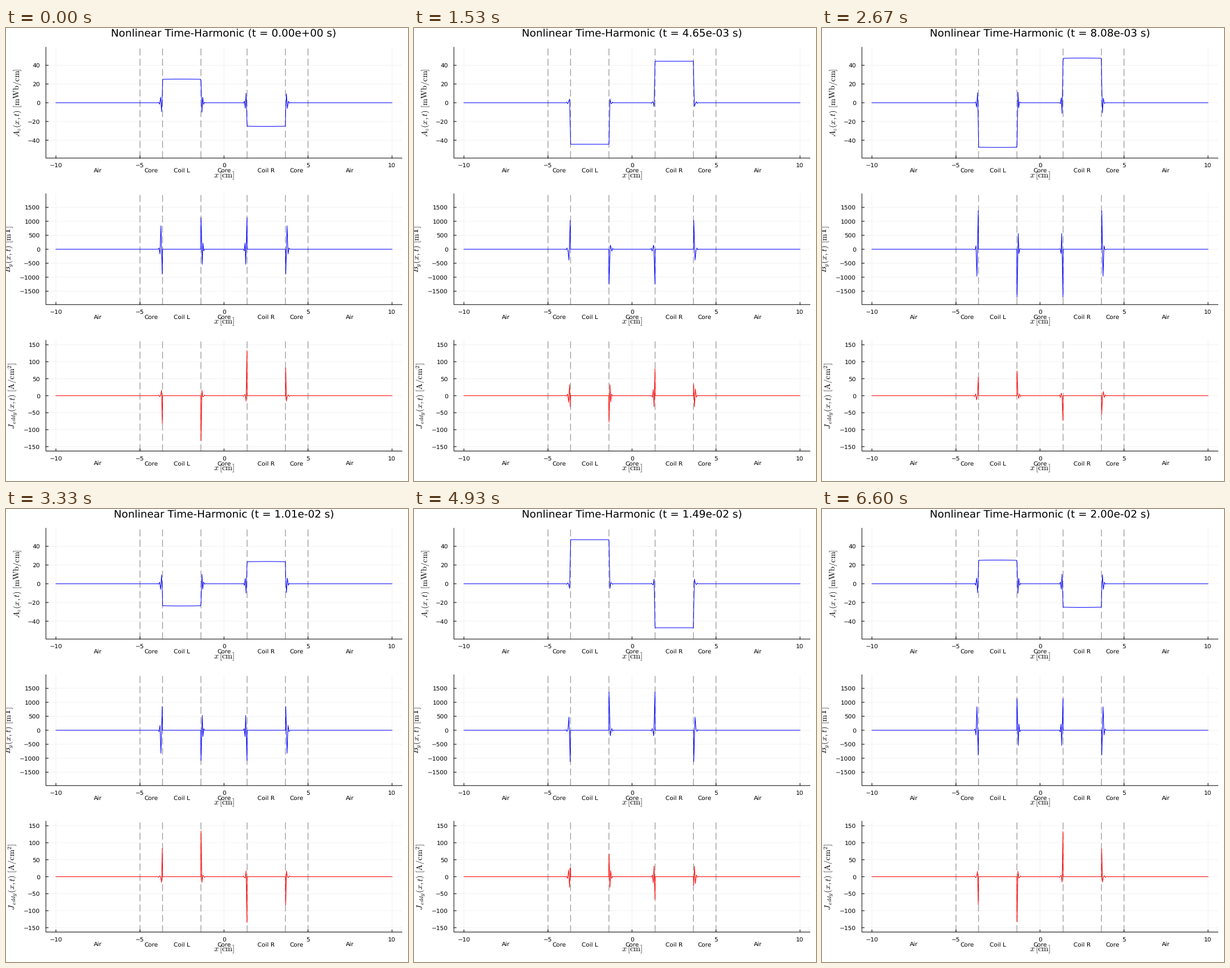
Write a matplotlib script that moves like this. It is 705 px wide and 794 px high and loops after 6.67 s.

```python
import numpy as np
import matplotlib.pyplot as plt
from matplotlib.animation import FuncAnimation

W, H, DPI = 705, 794, 100
TICK_MS, LOOP_MS = 23, 6670        # redraw interval, loop length
STEPS, STEP_MS = 100, 200 / 3      # solution steps at 15 per second
PERIOD = 0.02
PX = 72 / DPI                      # points per pixel

X0, X_SCALE = 382.3, 29.47         # pixel of x = 0, pixels per cm
LEFT, RIGHT = 70, 694.5
WALLS = (-5, -3.657, -1.374, 1.374, 3.657, 5)
REGIONS = ("Air", "Core", "Coil L", "Core", "Coil R", "Core", "Air")

plt.rcParams["font.family"] = "DejaVu Sans"
plt.rcParams["mathtext.fontset"] = "cm"
plt.rcParams["text.hinting"] = "none"
plt.rcParams["path.snap"] = False

fig = plt.figure(figsize=(W / DPI, H / DPI), dpi=DPI, facecolor="white")
ax = fig.add_axes([0, 0, 1, 1])
ax.set(xlim=(0, W), ylim=(H, 0))
ax.axis("off")


def px(x):
    return X0 + X_SCALE * x


def line(xs, ys, color, width=1, **kw):
    return ax.plot(xs, ys, color=color, lw=width * PX, **kw)[0]


def text(x, y, s, size=10.5, ha="center", **kw):
    return ax.text(x, y, s, fontsize=size * PX, ha=ha, va="baseline", **kw)


def mirror(x, v, sign):
    """Extend a left-half profile to the right half."""
    x, v = np.array(x), np.array(v, complex)
    return np.r_[x, 2 * X0 - x[::-1]], np.r_[v, sign * v[::-1]]


# Left-half phasors: outer core edge, coil, inner core edge
NODES_OUT = [px(-10), 266.5, 267.9, 269.4, 271.2, 272.8, 274.1]
NODES_IN = [342, 343.6, 345, 346.5, 348, 349.4]


def potential():
    u = np.linspace(-1, 1, 15)
    coil = 25 + 47.4j + 0.25 * (1 - u**2)
    x = [*NODES_OUT, *np.linspace(274.7, 341.4, 15), *NODES_IN]
    v = [0, 0, 0.4 - 0.6j, -1.6 + 0.9j, 6 - 0.3j, -9.6 - 5.1j, 8.3 + 28.3j,
         *coil, 22 + 46j, -10.2 - 5.2j, 5.8 + 1j, -1.8 + 0.9j, 0.4 - 0.6j, 0]
    return mirror(x, v, -1)


def flux():
    x = [px(-10), 265.6, 267, 268.4, 270, 271.7, 274, 274.4,
         341.5, 342, 344.2, 345.4, 346.9, 348.3, 349.7]
    v = [0, 0, 3 + 20j, 45 - 42j, -170 + 35j, 840 + 483j, -890 - 1140j, 0,
         0, 1130 + 1385j, -540 - 208j, 220 - 51j, -57 + 61j, 5 - 30j, 0]
    return mirror(x, v, 1)


def eddy():
    x = [*NODES_OUT, 274.5, 341.6, *NODES_IN]
    v = [0, 0, 2 + 1.2j, -2.6 - 5j, 1 + 20j, 16 - 31j, -82 + 24j, 0,
         0, -133 + 64j, 16 - 31j, -3 + 18j, -2.6 - 5.4j, 2 + 1.2j, 0]
    return mirror(x, v, -1)


def panel(zero, scale, ticks, label, label_x, field, color):
    top, bottom = zero - 97.3, zero + 97
    for x in (-10, -5, 0, 5, 10):
        line([px(x)] * 2, [top, bottom], "#f2f2f2", zorder=1)
        line([px(x)] * 2, [bottom, bottom - 4], "black", zorder=3)
        text(px(x), bottom + 16, str(x).replace("-", "\u2212"))
    for v in ticks:
        y = zero - scale * v
        line([LEFT, RIGHT], [y, y], "#f2f2f2", zorder=1)
        line([LEFT, LEFT + 4], [y, y], "black", zorder=3)
        text(59.7, y + 4, str(v).replace("-", "\u2212"), ha="right")
    line([LEFT, LEFT, RIGHT], [top, bottom, bottom], "black", zorder=3)

    for x in WALLS:
        ax.plot([px(x)] * 2, [bottom, top], color="#a0a0a0", lw=1.4 * PX,
                dashes=(12 / 1.4, 6 / 1.4), dash_capstyle="butt", zorder=2)
    edges = (-10, *WALLS, 10)
    for name, a, b in zip(REGIONS, edges, edges[1:]):
        text(px((a + b) / 2), bottom + 25, name)

    text(382, bottom + 34, r"$x\,[\mathrm{cm}]$", 14.4)
    text(label_x, zero, label, 14.4, rotation=90, rotation_mode="anchor")

    xs, phasor = field()
    return line(xs, np.full(len(xs), zero), color, zorder=4), phasor, zero, scale


panels = [
    panel(131, 1.642, range(-40, 41, 20),
          r"$A_z(x,t)\ [\mathrm{mWb/cm}]$", 24, potential, "blue"),
    panel(387.8, 0.049, range(-1500, 1501, 500),
          r"$B_y(x,t)\ [\mathrm{mT}]$", 9.5, flux, "blue"),
    panel(644.5, 0.5955, range(-150, 151, 50),
          r"$J_{\,eddy}(x,t)\ [\mathrm{A/cm}^2]$", 15, eddy, "red"),
]
title = text(382, 16, "", 18.35)


def step_at(tick):
    """Latest step begun in this tick; steps start on rounded 10 ms marks."""
    last_ms = (tick + 1) * TICK_MS - 1
    return min(int((last_ms + 5) / STEP_MS), STEPS - 1)


def update(tick):
    t = PERIOD * step_at(tick) / (STEPS - 1)
    turn = np.exp(2j * np.pi * t / PERIOD)
    title.set_text(f"Nonlinear Time-Harmonic (t = {t:.2e} s)")
    for curve, phasor, zero, scale in panels:
        curve.set_ydata(zero - scale * (phasor * turn).real)
    return [title] + [p[0] for p in panels]


anim = FuncAnimation(fig, update, frames=LOOP_MS // TICK_MS, interval=TICK_MS,
                     repeat=True, repeat_delay=0, blit=False)
plt.show()
```
